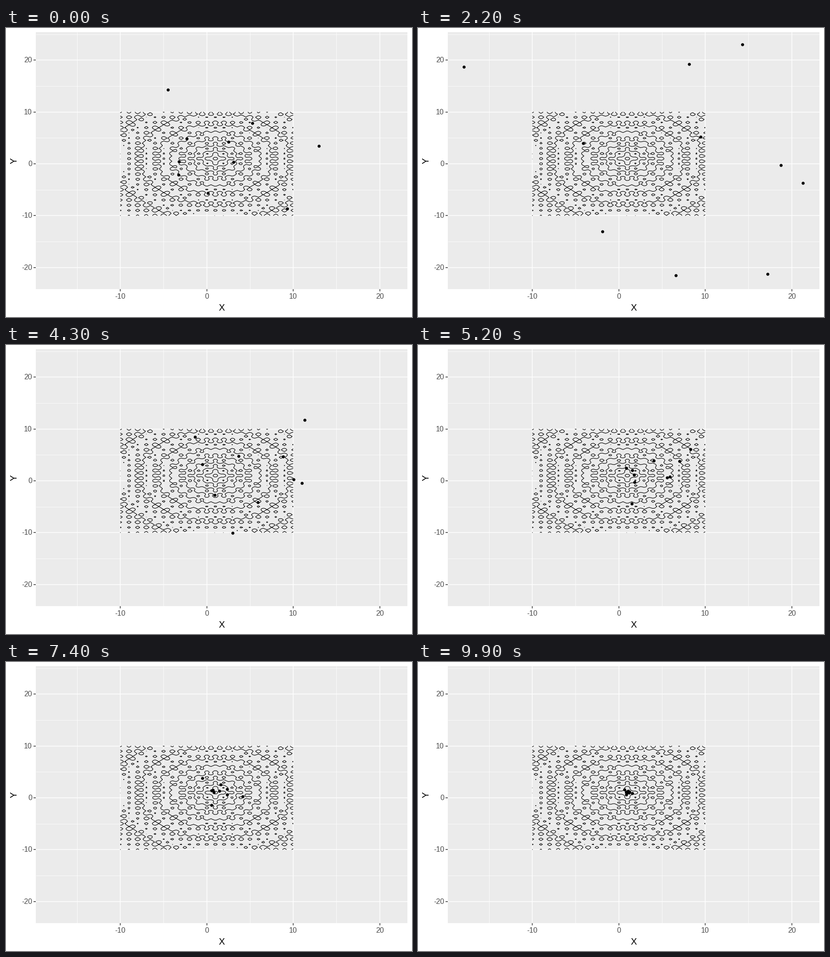
Recreate the animation shown at these times as a matplotlib script. Size 885 by 632 pixels, loop 10 s.

```python
import numpy as np
import matplotlib.pyplot as plt
from matplotlib.animation import FuncAnimation
from matplotlib.patches import Rectangle

W, H, DPI = 885, 632, 100
FRAMES, STEP = 100, 11          # frames per loop, frames per swarm iteration
PX = 72 / DPI                   # one pixel in points
LEFT, TOP, RIGHT, BOTTOM = 65, 9, 875, 571
FONT = "Liberation Sans"
GOAL = np.array([456, 285])     # stage position of the minimum at (1, 1)

# Per particle: start, first move, turning point; the rest follows by rule
SWARM = np.array([
    [(353, 135), (195, 86), (243, 131)],
    [(537, 208), (579, 124), (557, 152)],
    [(682, 258), (727, 128), (701, 84)],
    [(394, 242), (366, 242), (389, 254)],
    [(377, 292), (502, 262), (626, 236)],
    [(496, 293), (669, 298), (731, 298)],
    [(485, 249), (690, 295), (767, 323)],
    [(440, 361), (416, 419), (427, 394)],
    [(376, 321), (471, 451), (534, 493)],
    [(613, 395), (719, 491), (671, 452)],
], float)

# Inertia and pull to the goal as the swarm contracts
CONTRACT = [(1, 0.2), (0.6, 0.2), (0.3, 0.45), (0.1, 0.4), (0, 0.55), (0, 0.5)]


def sx(x):
    return 437.5 + 18.86 * x


def sy(y):
    return 297 - 11.34 * y


def ackley(x, y):
    """Ackley function with its minimum moved to (1, 1)."""
    bowl = -20 * np.exp(-0.2 * np.sqrt(0.5 * ((x - 1) ** 2 + (y - 1) ** 2)))
    waves = -np.exp(0.5 * (np.cos(2 * np.pi * x) + np.cos(2 * np.pi * y)))
    return bowl + waves + np.e + 20


def advance(prev, pos, inertia, pull):
    return pos + inertia * (pos - prev) + pull * (GOAL - pos)


def build_keys():
    start, first, turn = SWARM.transpose(1, 0, 2)
    keys = [start, first, advance(start, first, 1, 0.24), turn]
    for inertia, pull in CONTRACT:
        keys.append(advance(keys[-2], keys[-1], inertia, pull))
    return keys


KEYS = build_keys()

fig = plt.figure(figsize=(W / DPI, H / DPI), dpi=DPI, facecolor="white")
ax = fig.add_axes([0, 0, 1, 1])
ax.set_xlim(0, W)
ax.set_ylim(H, 0)
ax.axis("off")
ax.add_patch(Rectangle((LEFT, TOP), RIGHT - LEFT, BOTTOM - TOP,
                       fc="#EBEBEB", ec="none", zorder=0))


def line(xs, ys, color, width, z):
    ax.plot(xs, ys, color=color, lw=width * PX, zorder=z,
            solid_capstyle="butt")


def label(x, y, text, size, color, **kw):
    ax.text(x, y, text, fontsize=size * PX, color=color, family=FONT,
            **{"ha": "center", "va": "center", **kw})


def draw_grid():
    for v in range(-15, 26, 10):
        if v < 25:
            line([sx(v)] * 2, [TOP, BOTTOM], "white", 0.8, 1)
        line([LEFT, RIGHT], [sy(v)] * 2, "white", 0.8, 1)
    for v in range(-20, 21, 10):
        if v > -20:
            line([sx(v)] * 2, [TOP, BOTTOM], "white", 1.5, 2)
            line([sx(v)] * 2, [BOTTOM, BOTTOM + 5], "#333333", 1.5, 2)
            label(sx(v), 588, str(v), 16, "#4D4D4D")
        line([LEFT, RIGHT], [sy(v)] * 2, "white", 1.5, 2)
        line([LEFT - 5, LEFT], [sy(v)] * 2, "#333333", 1.5, 2)
        label(57, sy(v) + 0.5, str(v), 16, "#4D4D4D", ha="right")
    label(470, 612, "X", 20, "black")
    label(18, 290.5, "Y", 20, "black", rotation=90)


def draw_contours():
    v = np.linspace(-10, 10, 100)
    gx, gy = np.meshgrid(v, v)
    ax.contour(sx(gx), sy(gy), ackley(gx, gy), levels=range(2, 21, 2),
               colors="black", linewidths=1.15 * PX, zorder=3)


draw_grid()
draw_contours()
dots, = ax.plot([], [], "o", color="black", ms=6.6 * PX, mew=0, zorder=5)


def update(frame):
    i = min(frame // STEP, len(KEYS) - 2)
    t = (frame - i * STEP) / STEP
    pos = KEYS[i] + t * (KEYS[i + 1] - KEYS[i])
    dots.set_data(pos[:, 0], pos[:, 1])
    return dots,


anim = FuncAnimation(fig, update, frames=FRAMES, interval=100,
                     repeat=True, repeat_delay=0)
plt.show()
```
